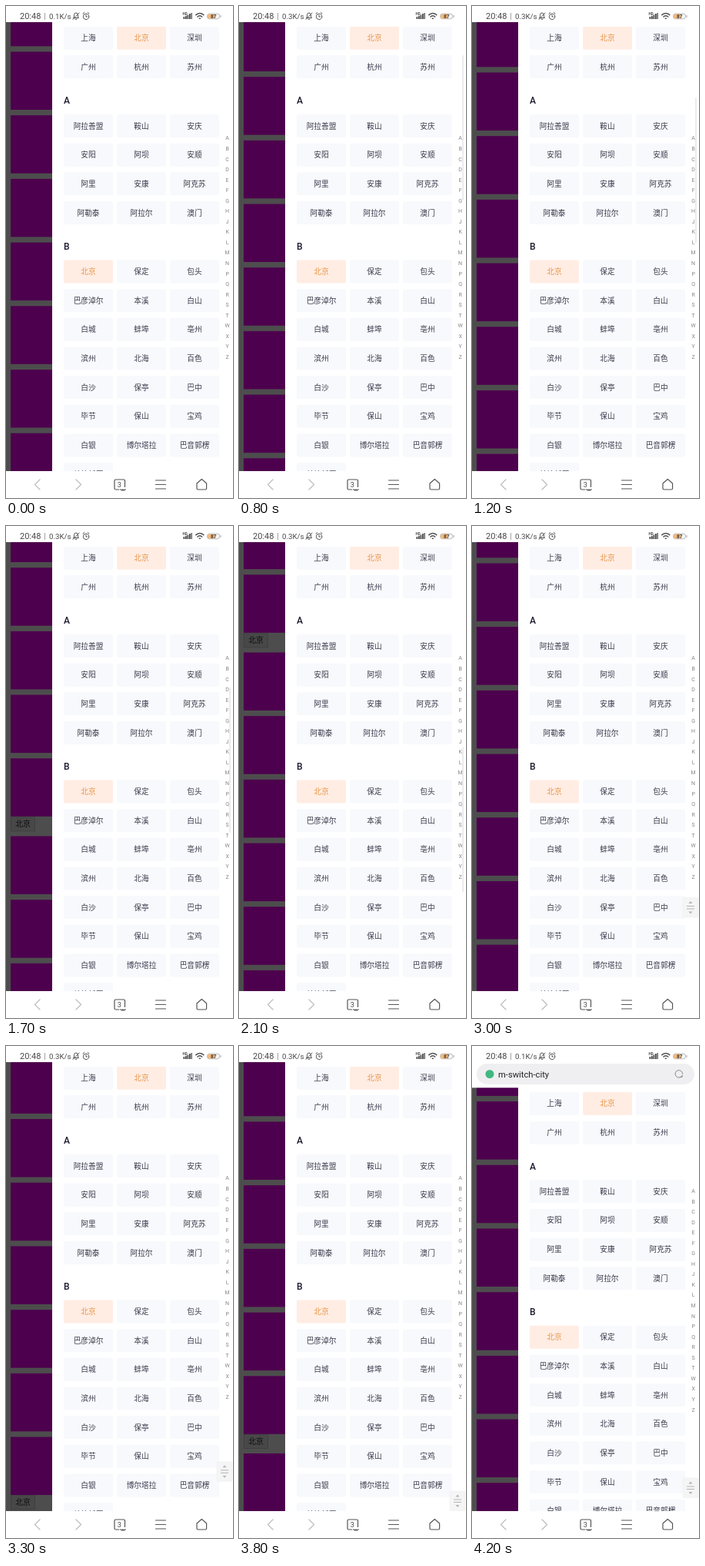
An HTML page for the animation above (4.3 s loop, 295 by 640 pixels).

```html
<!DOCTYPE html>
<html lang="zh-CN">
<head>
<meta charset="utf-8">
<style>
  html, body { margin: 0; width: 100%; height: 100%; overflow: hidden; background: #fff; }
  svg { display: block; font-family: Roboto, "Noto Sans CJK SC", "Noto Sans CJK", sans-serif; }
  .mid { text-anchor: middle; }
  .line { fill: none; stroke: #555; stroke-linecap: round; stroke-linejoin: round; }
</style>
</head>
<body>
<svg width="295" height="640" viewBox="0 0 295 640">
  <rect width="295" height="640" fill="#4d4d4d"/>
  <g id="list"></g>
  <rect x="60" width="235" height="640" fill="#fff"/>
  <g id="panel"></g>
  <g id="index"></g>
  <rect id="thumb" x="290" width="2" height="189" rx="1" fill="#ececee"/>
  <g id="handle">
    <rect x="274" y="-13" width="20" height="25.5" rx="1.5" fill="#f5f5f6" stroke="#eee" stroke-width=".6"/>
    <path d="M279 -2H289M279 1.500H289" stroke="#b4b4b4"/>
    <path d="M281.500 -5.500h5l-2.500 -3zM281.500 5h5l-2.500 3z" fill="#b4b4b4"/>
  </g>

  <g id="address">
    <rect y="21" width="295" height="33.3" fill="#fff"/>
    <rect x="6" y="23" width="283" height="27" rx="13.5" fill="#efeff1"/>
    <circle cx="23" cy="36.5" r="5.5" fill="#41b883"/>
    <text x="34" y="40.5" font-size="11.2" fill="#222">m-switch-city</text>
    <path class="line" style="stroke:#888" d="M272.5 39.5a4.8 4.8 0 1 1 1.2 -3.2M271 40.3h2.2v-2.2"/>
  </g>

  <rect width="295" height="21" fill="#fff"/>
  <g fill="#484848">
    <text x="18" y="17" font-size="11">20:48</text>
    <path d="M50.5 9v9" stroke="#888" stroke-width=".8"/>
    <text id="speed" x="56" y="17" font-size="9.7"></text>
    <text x="229.5" y="12" font-size="4.5" font-weight="700">HD</text>
    <path d="M230.500 14h1.8v3h-1.8zM233 13h1.8v4h-1.8zM235.500 11.500h1.8v5.500h-1.8zM238 10h1.8v7h-1.8zM240.500 9h1.300v8h-1.300z"/>
  </g>
  <g class="line">
    <path d="M87.500 15.500h7l-1 -1.500v-2.500a2.500 2.500 0 0 0 -5 0v2.500zM90 17.300h2M87 17.500l8 -8.500"/>
    <circle cx="104" cy="13.800" r="3.700"/>
    <path d="M104 11.800v2.200h1.600M100 10l1.800 -1.500M108 10l-1.800 -1.500"/>
    <path stroke-width="1.6" d="M246.800 11.600q5 -4.200 10 0M248.900 14q2.900 -2.500 5.800 0M251.300 16.300h1"/>
  </g>
  <rect x="261.500" y="10" width="16" height="6.800" rx="3" fill="#f8f8f8" stroke="#aaa" stroke-width=".8"/>
  <path d="M264.500 10.500h7v5.800h-7a2.500 2.900 0 0 1 0 -5.800z" fill="#f5b878"/>
  <path d="M279 12v3" stroke="#aaa"/>
  <text class="mid" x="269.8" y="15.800" font-size="6.500" font-weight="700" fill="#444">87</text>

  <rect y="605" width="295" height="35" fill="#fff"/>
  <g class="line" stroke-width="1.2">
    <path style="stroke:#bbb" d="M44 616l-6.5 6.5l6.5 6.5M91 616l6.5 6.5l-6.5 6.5"/>
    <path d="M147 629h-4.5q-1.5 0 -1.5 -1.5v-10q0 -1.5 1.5 -1.5h10.5q1.5 0 1.5 1.5v8M149 628.5a1.5 1.3 0 1 0 3 0a1.5 1.3 0 1 0 3 0"/>
    <path d="M194.5 617h13M194.5 622.5h13M194.5 628h13"/>
    <path d="M248 621l6.3 -5.5l6.3 5.5v6.5q0 1.5 -1.5 1.5h-9.6q-1.5 0 -1.5 -1.5z"/>
  </g>
  <text class="mid" x="147.3" y="626" font-size="9" fill="#444">3</text>
</svg>
<script>
const $ = id => document.getElementById(id);

function add(parent, tag, attrs, text = '') {
  const el = document.createElementNS('http://www.w3.org/2000/svg', tag);
  for (const key in attrs) el.setAttribute(key, attrs[key]);
  el.textContent = text;
  parent.append(el);
}

function label(parent, x, y, size, fill, text) {
  add(parent, 'text', { class: 'mid', x, y, 'font-size': size, fill }, text);
}

// Page behind the panel: runs of blocks divided by buttons
const PITCH = 82.7;
function blocks(top, count) {
  for (let i = 0; i < count; i++)
    add($('list'), 'rect', { x: 6, y: top + i * PITCH, width: 60, height: 75.5, fill: '#4d004d' });
}
function button(y) {
  add($('list'), 'rect', { x: 6.5, y: y + .5, width: 31, height: 18, fill: '#484848', stroke: '#3e3e3e', 'stroke-width': .8 });
  label($('list'), 22, y + 12.8, 9.8, '#0c0c0c', '北京');
}
blocks(-23.2, 12);
button(962.6);
blocks(987.7, 9);
button(1725);
blocks(1750, 1);

// City panel
function cities(top, names) {
  names.split(' ').forEach((name, i) => {
    const x = 75 + i % 3 * 69, y = top + Math.floor(i / 3) * 37.67, on = name === '北京';
    add($('panel'), 'rect', { x, y, width: 64, height: 30, rx: 2, fill: on ? '#ffede4' : '#f8f9fc' });
    label($('panel'), x + 32, y + 18.5, 9.7, on ? '#e89344' : '#38384a', name);
  });
}
function title(y, text) {
  add($('panel'), 'text', { x: 75, y, 'font-size': 12, 'font-weight': 500, fill: '#1c1c30' }, text);
}
cities(26.7, '上海 北京 深圳 广州 杭州 苏州');
title(127.4, 'A');
cities(141, '阿拉善盟 鞍山 安庆 安阳 阿坝 安顺 阿里 安康 阿克苏 阿勒泰 阿拉尔 澳门');
title(316.7, 'B');
cities(330.5, '北京 保定 包头 巴彦淖尔 本溪 白山 白城 蚌埠 亳州 滨州 北海 百色 ' +
  '白沙 保亭 巴中 毕节 保山 宝鸡 白银 博尔塔拉 巴音郭楞 蚌埠新区');
[...'ABCDEFGHJKLMNPQRSTWXYZ'].forEach((c, i) =>
  label($('index'), 287.6, 174.4 + i * 13.55, 7, '#85858c', c));

// Piecewise linear value over [time, value] points
function track(points, t) {
  let [t0, v0] = points[0];
  for (const [t1, v1] of points) {
    if (t < t1) return t <= t0 ? v0 : v0 + (v1 - v0) * (t - t0) / (t1 - t0);
    [t0, v0] = [t1, v1];
  }
  return v0;
}
const SCROLL = [[300, 0], [700, 90], [1200, 303.8], [1700, 584.2], [2100, 823.2], [2300, 862],
  [2400, 862], [3000, 1021.9], [3500, 1220], [3800, 1220], [4200, 1081]];
const BAR = [[3800, 0], [4100, 1]];
const HANDLE = [[2400, 421], [3000, 496.5], [3500, 592], [3800, 592], [4200, 575]];

const move = (id, y) => $(id).setAttribute('transform', `translate(0 ${y})`);
const show = (id, on) => $(id).setAttribute('visibility', on ? 'visible' : 'hidden');

function draw(now) {
  const t = Math.floor(now % 4300 / 100) * 100;
  const scroll = track(SCROLL, t), bar = track(BAR, t);
  move('list', -scroll);
  move('panel', 33.3 * bar);
  move('index', 16.6 * bar);
  move('address', 33.3 * (bar - 1));
  move('handle', track(HANDLE, t));
  $('thumb').setAttribute('y', 21 + scroll * 584 / 1804);
  show('address', bar > 0);
  show('thumb', t >= 400 && t < 2500);
  show('handle', t >= 2500);
  $('speed').textContent = t >= 700 && t < 4000 ? '0.3K/s' : '0.1K/s';
}

let start;
function frame(now) {
  start ??= now;
  draw(now - start);
  requestAnimationFrame(frame);
}
draw(0);
requestAnimationFrame(frame);
</script>
</body>
</html>
```
